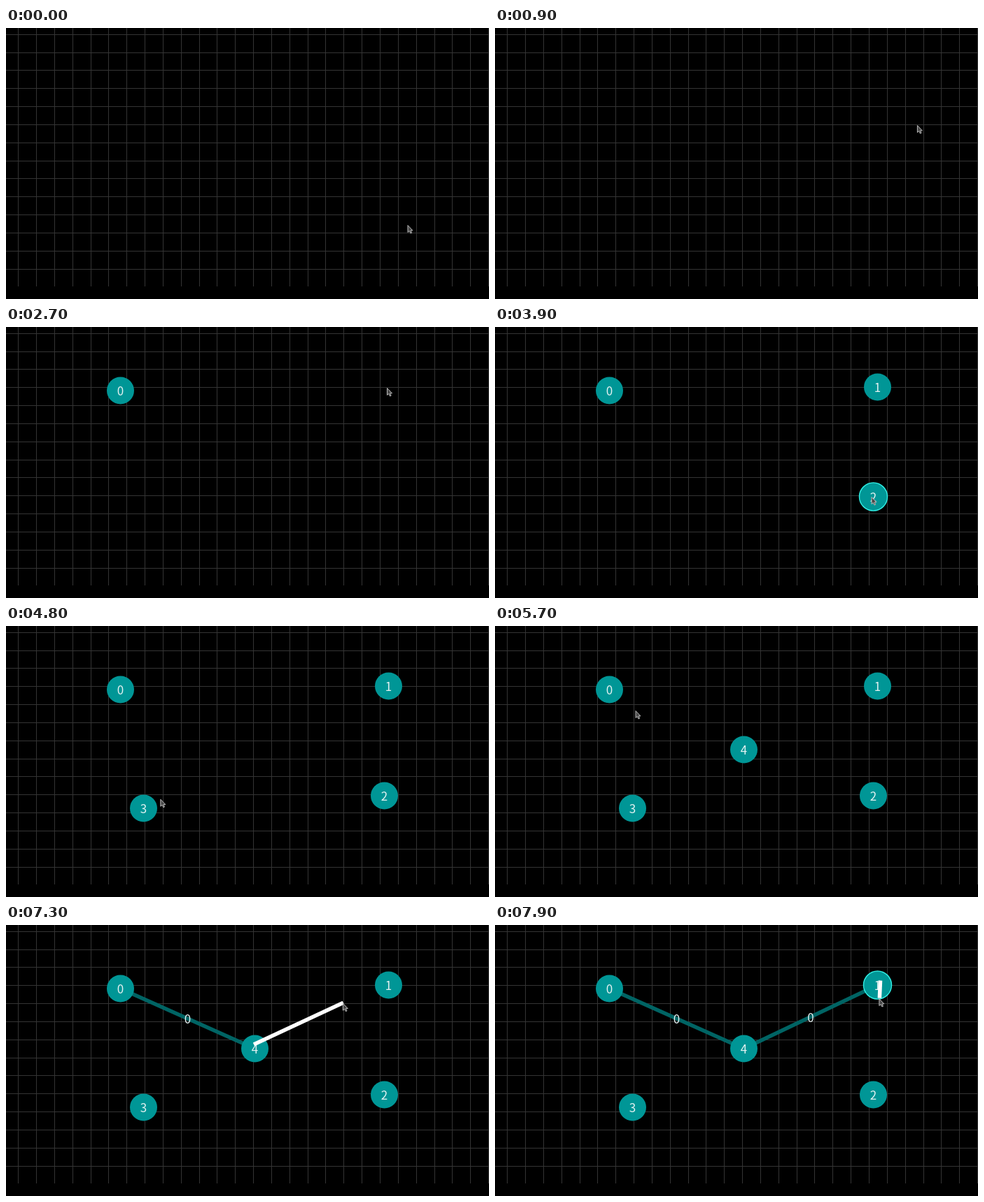
An HTML page with a canvas that plays this animation: 690x388 px, repeating every 8 s.

```html
<!DOCTYPE html>
<html lang="en">
<head>
<meta charset="utf-8">
<title>Graph editor</title>
<style>
html, body { margin: 0; width: 100%; height: 100%; overflow: hidden; background: #000; }
canvas { display: block; }
</style>
</head>
<body>
<canvas id="stage" width="690" height="388"></canvas>
<script>
const ctx = document.getElementById('stage').getContext('2d');
const LOOP = 8000, STEP = 100, PITCH = 25.84, RADIUS = 19.5;

const node = (x, y, born) => ({ x, y, born });
const nodes = [
  node(163.5, 91, 2200), node(546.5, 86, 3000), node(540.5, 243, 3700),
  node(196.5, 261, 4600), node(355.5, 177, 5300)
];

// each edge is dragged out from press to release
const edge = (a, b, press, release) => ({ a: nodes[a], b: nodes[b], press, release });
const edges = [edge(0, 4, 6100, 6900), edge(4, 1, 7000, 7700), edge(1, 2, 7800, 8400)];

// the cursor eases to each point in turn and rests there until the next move
const move = (start, end, x, y) => ({ start, end, x, y });
const moves = [
  move(0, 300, 667, 146),
  move(700, 1600, 163, 91),
  move(2400, 2700, 544.5, 87),
  move(3100, 3300, 562, 155),
  move(3300, 3500, 538, 243),
  move(3900, 4500, 196, 261),
  move(4700, 5100, 355, 176),
  move(5400, 5700, 201, 121),
  move(5700, 6000, 168.5, 90),
  move(6100, 6700, 354, 171),
  move(7000, 7500, 550.5, 79.5),
  move(7800, 8200, 540, 243)
];

function cursorAt(t) {
  let x = 574, y = 282;
  for (const m of moves) {
    const u = Math.min(1, Math.max(0, (t - m.start) / (m.end - m.start)));
    const k = u * u * (3 - 2 * u);
    x += (m.x - x) * k;
    y += (m.y - y) * k;
  }
  return { x, y };
}

function line(p, q, color) {
  ctx.strokeStyle = color;
  ctx.lineWidth = 5.5;
  ctx.beginPath();
  ctx.moveTo(p.x, p.y);
  ctx.lineTo(q.x, q.y);
  ctx.stroke();
}

function label(text, x, y) {
  ctx.fillStyle = '#e4f2f2';
  ctx.fillText(text, x, y + 7);
}

function drawGrid() {
  ctx.fillStyle = '#000';
  ctx.fillRect(0, 0, 690, 388);
  ctx.fillStyle = '#343434';
  for (let x = 17.7; x < 690; x += PITCH) ctx.fillRect(Math.floor(x), 0, 1, 370);
  for (let y = 9.25; y < 370; y += PITCH) ctx.fillRect(0, Math.floor(y), 690, 1);
}

function drawNode({ x, y }, name, hover) {
  ctx.fillStyle = '#009696';
  ctx.beginPath();
  ctx.arc(x, y, RADIUS, 0, 2 * Math.PI);
  ctx.fill();
  if (hover) {
    ctx.strokeStyle = '#2ef0e6';
    ctx.lineWidth = 1.5;
    ctx.beginPath();
    ctx.arc(x, y, RADIUS + 0.5, 0, 2 * Math.PI);
    ctx.stroke();
  }
  label(name, x, y);
}

const arrow = new Path2D('M0 0V10L2.3 8L4 11.5L5.6 10.8L4.1 7.4H7Z');

function drawCursor({ x, y }) {
  ctx.save();
  ctx.translate(x, y + 0.5);
  ctx.fillStyle = '#484848';
  ctx.strokeStyle = '#bcbcbc';
  ctx.lineWidth = 1;
  ctx.fill(arrow);
  ctx.stroke(arrow);
  ctx.restore();
}

function draw(t) {
  const cursor = cursorAt(t);
  drawGrid();
  ctx.font = '17px "Noto Sans CJK JP", "Noto Sans CJK SC", "Noto Sans", sans-serif';
  ctx.textAlign = 'center';

  for (const { a, b, release } of edges) {
    if (t < release) continue;
    line(a, b, '#006464');
    label('0', (a.x + b.x) / 2, (a.y + b.y) / 2);
  }
  nodes.forEach((n, i) => {
    const hover = Math.hypot(cursor.x - n.x, cursor.y - n.y) < RADIUS;
    if (t >= n.born) drawNode(n, i, hover);
  });
  for (const { press, release } of edges) {
    if (t > press && t < release) {
      line(cursorAt(press), { x: cursor.x + 0.5, y: cursor.y - 0.5 }, '#fff');
    }
  }
  drawCursor(cursor);
}

function tick() {
  const t = performance.now() % LOOP;
  draw(Math.floor(t / STEP) * STEP);
  requestAnimationFrame(tick);
}
tick();
</script>
</body>
</html>
```
